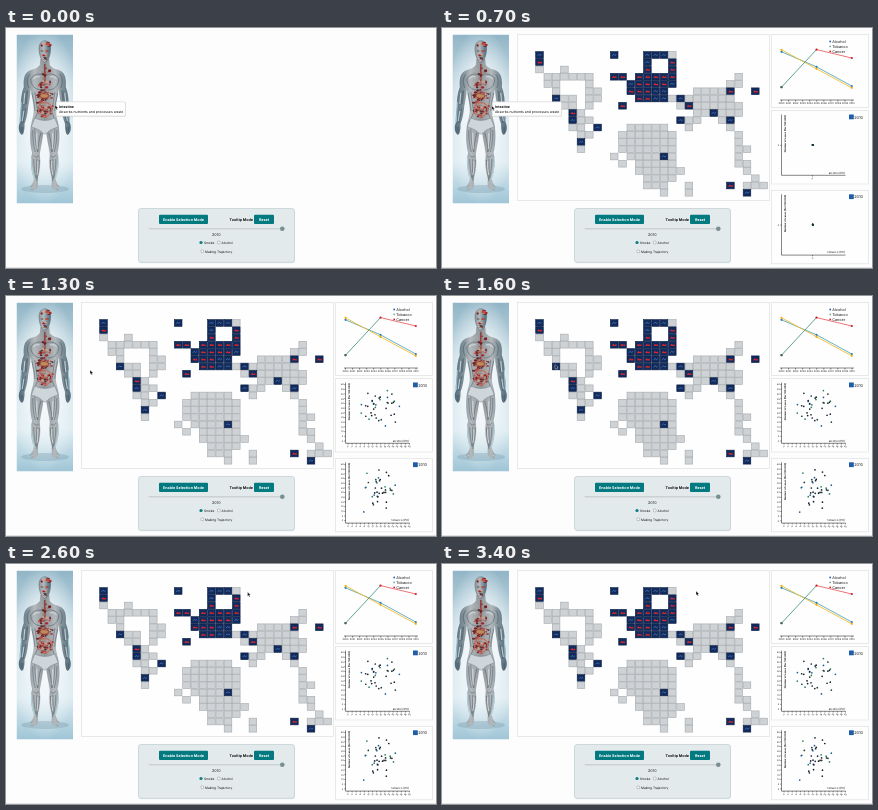
An HTML page for the animation above (3.5 s loop, 430x240 px).

```html
<!DOCTYPE html>
<html lang="en">
<head>
<meta charset="utf-8">
<title>Health dashboard</title>
<style>
  html, body { margin: 0; width: 100%; height: 100%; overflow: hidden; background: #fdfdfd; }
  svg { display: block; width: 430px; height: 240px; }
  text { font-family: Inter, Roboto, sans-serif; fill: #111; text-rendering: geometricPrecision; }
  .panel { fill: #fefefe; stroke: #dfe1e2; stroke-width: .7; }
  .axis { stroke: #222; stroke-width: .55; fill: none; }
</style>
</head>
<body>
<svg id="stage" viewBox="0 0 430 240" xmlns="http://www.w3.org/2000/svg">
  <defs>
    <linearGradient id="sky" x2="0" y2="1">
      <stop offset="0" stop-color="#91b5c6"/><stop offset=".3" stop-color="#c0d7e1"/>
      <stop offset=".75" stop-color="#dcebf1"/><stop offset="1" stop-color="#9fc5d6"/>
    </linearGradient>
    <radialGradient id="glow">
      <stop offset="0" stop-color="#fafcfd"/><stop offset=".5" stop-color="#f3f8fa" stop-opacity=".85"/>
      <stop offset="1" stop-color="#f3f8fa" stop-opacity="0"/>
    </radialGradient>
    <linearGradient id="skin">
      <stop offset="0" stop-color="#8f9498"/><stop offset=".4" stop-color="#b3b9bc"/>
      <stop offset=".7" stop-color="#7d8d96"/><stop offset="1" stop-color="#536d7d"/>
    </linearGradient>
    <clipPath id="frame"><rect x="10.5" y="6.5" width="56.5" height="169"/></clipPath>
    <g id="half">
      <path fill="url(#skin)" d="M-.2 31H4.5L5 37C8 41 12 41 16 43C21 46 21.5 52 21 59
        C23.5 65 24 72 24 79C25 86 25 92 25 95C27 99 26 105 23 107C21 106 20 101 20.3 96
        C18 90 17 84 16.5 78C15 71 14.5 66 14 61C13 68 11.5 74 11 82C11 88 13 92 14 98
        C15 106 15 116 12.7 125C14.8 132 14 142 11 151C11 155 15 158 15 161C13 164 8 163 6.8 158
        L7 150C4.5 142 4 135 5 126C3.6 117 2 110 1 102L-.2 100Z"/>
      <g fill="none" stroke="#36464f" stroke-width=".7" opacity=".6">
        <path d="M1 47C6 45 11 46 14 51C14 57 10 62 3 62M15 46C18 50 18 55 16 60M10 64L7 84L11 94
          M13 65C11 73 10 78 10 83M18 63L20 77M19 80L22 95M17 62L18.5 76M22 99V106M23.5 99V105"/>
        <path d="M10 100C10 110 9 118 7 124M4 105C6 112 7 119 7 124M12 102C12 111 11 119 9.5 124
          M6 128C9 130 10 129 11 127M8 131L8.5 151M11 131C11 138 10 145 9 150M5.5 132C6 140 7 146 8 153"/>
      </g>
      <g fill="none" stroke="#e3eaec" stroke-width="1" opacity=".75">
        <path d="M5 49C8 48 10 49 12 51M8 105C8 111 8 116 7.5 121M7 133C6.5 138 7 143 8 147M20 65L21 76M21 83L22.5 93"/>
      </g>
      <path fill="none" stroke="#b5e7f7" stroke-width="1" opacity=".7"
        d="M23.5 74L24.5 94M13.5 130C13.5 138 12 146 10.5 151M12 159L15 161"/>
    </g>
  </defs>
</svg>
<script>
const LOOP = 3500, STEP = 100;
const stage = document.getElementById('stage');

function el(tag, attrs = {}, parent = stage, text) {
  const node = document.createElementNS(stage.namespaceURI, tag);
  for (const k in attrs) node.setAttribute(k, attrs[k]);
  if (text !== undefined) node.textContent = text;
  parent.appendChild(node);
  return node;
}
const group = (parent = stage) => el('g', {}, parent);
const box = (x, y, width, height, attrs, parent) => el('rect', { x, y, width, height, ...attrs }, parent);
const dot = (cx, cy, r, fill, parent) => el('circle', { cx, cy, r, fill }, parent);
const path = (d, attrs, parent) => el('path', { d, fill: 'none', ...attrs }, parent);
const label = (x, y, size, text, attrs, parent) => el('text', { x, y, 'font-size': size, ...attrs }, parent, text);
const mid = { 'text-anchor': 'middle' };
const bold = { 'font-weight': 700 };

function random(seed) {
  return () => (seed = (seed * 16807) % 2147483647) / 2147483647;
}

function drawBody() {
  const g = group();
  g.setAttribute('clip-path', 'url(#frame)');
  box(10.5, 6.5, 56.5, 169, { fill: 'url(#sky)' }, g);
  el('ellipse', { cx: 39, cy: 88, rx: 36, ry: 88, fill: 'url(#glow)' }, g);
  el('ellipse', { cx: 39, cy: 161, rx: 24, ry: 4, fill: '#7799aa', opacity: .35 }, g);
  const body = el('g', { transform: 'translate(38.8 0)' }, g);
  for (const s of [1, -1]) el('use', { href: '#half', transform: `scale(${s} 1)` }, body);
  path('M-5.8 21C-6 10 6 10 5.8 21C5.5 28 3 34 0 34.5C-3 34-5.5 28-5.8 21Z', { fill: 'url(#skin)', stroke: '#59656b', 'stroke-width': .5 }, body);
  path('M-10 90Q0 95 10 90L13.5 99Q5 101 1 106H-1Q-5 101-13.5 99Z', { fill: '#cfd6da', stroke: '#74858f', 'stroke-width': .5 }, body);
  path('M-4 23H-1.4M1.4 23H4M-1.5 29.5H1.5', { stroke: '#46363a', 'stroke-width': .8 }, body);
  path('M0 36V54', { stroke: '#8d4541', 'stroke-width': 1.6 }, body);

  // Organ clusters: centre x, centre y, half width, half height, count
  const rnd = random(91);
  const tones = ['#a52626', '#712024', '#c4483c', '#c9a18c', '#5c3032', '#a9756a'];
  for (const [x, y, w, h, n] of [[1, 17, 4.3, 3.5, 10], [1, 27, 3, 5, 6], [0, 44, 6, 4, 8], [1, 56, 7, 6, 22], [0, 67, 9, 5, 30], [0, 80, 8.5, 10, 54]])
    for (let i = 0; i < n; i++) {
      const a = rnd() * 6.283, d = Math.sqrt(rnd());
      el('ellipse', {
        cx: x + Math.cos(a) * d * w, cy: y + Math.sin(a) * d * h,
        rx: .7 + rnd() * 1.2, ry: .6 + rnd() * .8, fill: tones[i % 6]
      }, body);
    }
  path('M-5 67Q-2 64 4 67Q5 69 1 70Q-4 71-5 67Z', { fill: '#c28a58', stroke: '#7e2a28', 'stroke-width': .6 }, body);
  path('M-6 77Q0 72 6 77Q8 84 3 88Q-2 90-6 85Z', { stroke: '#c4685a', 'stroke-width': 1 }, body);
}

function drawControls() {
  box(132.5, 181, 156.5, 54.2, { rx: 3, fill: '#d3dcdf', opacity: .6 });
  box(132.5, 180.5, 156, 53.8, { rx: 2.5, fill: '#e3eaec', stroke: '#c0cdd2', 'stroke-width': .7 });
  const button = (x, w, text) => {
    box(x, 186.8, w, 9.2, { rx: 1, fill: '#027a80' });
    label(x + w / 2, 192.8, 3.7, text, { ...mid, ...bold, style: 'fill:#fff' });
  };
  button(153, 49, 'Enable Selection Mode');
  button(248, 20, 'Reset');
  label(235.3, 192.8, 3.7, 'Tooltip Mode', { ...mid, ...bold });
  box(142.5, 200, 135, 1.6, { rx: .8, fill: '#ccd1d3' });
  dot(276.3, 200.8, 2.3, '#788f92');
  label(210.3, 208, 3.7, '2010', mid);
  dot(195, 214.5, 1.6, '#0b7d80');
  label(198, 215.7, 3.2, 'Smoke');
  const check = (x, y) => box(x, y, 2.6, 2.6, { rx: .4, fill: '#fff', stroke: '#777', 'stroke-width': .4 });
  check(211.5, 213.2);
  label(215.5, 215.7, 3.2, 'Alcohol');
  check(195, 222);
  label(199, 224.6, 3.2, 'Making Trajectory');
  box(0, 239, 430, 1, { fill: '#e3e3e3' });
}

// g: no data, b: data, r: data with a red mark
const TILES = [
  'b........b...bbbg',
  'r............b..r',
  'g..g.........r..r',
  '.gggggg..rr.rrrrr.......g',
  '.gg...g....brrrrb......gg',
  '..g...gg...rrrbb...ggggr..r',
  '..bgg.gg....rrbbgbgggggg',
  '...gg.g...r......grgggggg',
  '....rg.............ggbggg',
  '....bgg..........bgg..gb',
  '....gg.b...ggggg..g....g',
  '.....gg...ggggggg.......g',
  '.....b....ggggggg.......g',
  '.....g....ggggggg.......gg',
  '.........g.ggggbg.......g',
  '..........g.ggggg.......gg',
  '............gggggg.......g',
  '.............gggg.........g',
  '.............ggg..g....r.ggg',
  '...............g..g......b'
];

function drawMap() {
  const g = group();
  box(75.5, 6.5, 252, 166, { class: 'panel' }, g);
  TILES.forEach((row, r) => [...row].forEach((kind, c) => {
    if (kind === '.') return;
    const x = 97.5 + c * 8.3, y = 27 + r * 7.25;
    box(x - 3.8, y - 3.35, 7.6, 6.7, {
      fill: kind === 'g' ? '#cfd2d4' : '#102b5c',
      stroke: kind === 'g' ? '#a4a9ad' : '#0a1d43', 'stroke-width': .6
    }, g);
    if (kind === 'b') path(`M${x - 2} ${y + .8}l1.5-1.6 1.3 1.2 1.3-.8`, { stroke: '#4a72b4', 'stroke-width': .9 }, g);
    if (kind === 'r') path(`M${x - 2.3} ${y + 1}l1.4-2.1 1.5 1 1.6-.3.4 1.7z`, { fill: '#d8262e' }, g);
  }));
  return g;
}

function drawLines(parent) {
  box(329.5, 6.5, 97, 73, { class: 'panel' }, parent);
  path('M338 72H412', { class: 'axis' }, parent);
  for (let i = 0; i <= 10; i++) {
    const x = 339.5 + i * 7.05;
    path(`M${x} 72v1.5`, { class: 'axis' }, parent);
    label(x, 76.2, 2.4, 2000 + i, mid, parent);
  }
  const xs = [339.5, 374.5, 409.8];
  const series = (ys, color, tones) => {
    for (let i = 0; i < 2; i++)
      path(`M${xs[i]} ${ys[i]}L${xs[i + 1]} ${ys[i + 1]}`, { stroke: tones[i], 'stroke-width': .9 }, parent);
    ys.forEach((y, i) => dot(xs[i], y, 1.1, color, parent));
  };
  series([23.8, 38.8, 58], '#2f78b8', ['#58aabd', '#58aabd']);
  series([21.8, 40.8, 59.8], '#f0b000', ['#f2bd35', '#f2bd35']);
  series([59.2, 21.6, 30], '#d51920', ['#4c998c', '#ee6567']);
  dot(339.5, 59.2, 1.1, '#23766f', parent);
  [['Alcohol', '#2664ad'], ['Tobacco', '#7fae9c'], ['Cancer', '#d51920']].forEach(([name, color], i) => {
    dot(388.2, 13.5 + i * 4.9, .9, color, parent);
    label(390.2, 14.9 + i * 4.9, 3.8, name, {}, parent);
  });
}

function drawScatter(parent, top, name, seed, cx, cy, spread) {
  const g = el('g', { transform: `translate(0 ${top})` }, parent);
  box(329.5, 82.5, 97, 73.5, { class: 'panel' }, g);
  path('M339.5 86.5V147.3H403.5', { class: 'axis' }, g);
  label(0, 0, 2.45, 'Number of cases (Per 100.000)', { ...bold, 'text-anchor': 'end', transform: 'translate(343.6 87) rotate(-90)' }, g);
  label(403, 145.7, 2.8, name, { 'text-anchor': 'end' }, g);
  box(407, 86.5, 4.8, 4.8, { fill: '#1f5da8' }, g);
  label(412.2, 90.6, 3.9, '2010', {}, g);

  const rnd = random(seed), bell = () => rnd() + rnd() - 1;
  const tones = ['#111c22', '#1d3a35', '#14213f', '#27815f', '#1c2b33', '#1f5d9c'];
  const marks = Array.from({ length: 38 }, (_, i) => ({
    x: cx + bell() * spread, y: cy + bell() * 29,
    node: dot(370.8, 117, .85, tones[i % 6], g)
  }));
  const ticks = [];
  for (let i = 0; i < 16; i++)
    ticks.push({ x: 342 + i * 4.1, y: 147.3, node: tick('M0 0v1.2', 0, 4, i * 2, 'rotate(35 0 3)') });
  for (let i = 0; i < 13; i++)
    ticks.push({ x: 339.5, y: 145 - i * 4.7, side: true, node: tick('M0 0h-1.2', -3.1, .8, i * 5, '') });
  function tick(d, x, y, value, transform) {
    const t = group(g);
    path(d, { class: 'axis' }, t);
    label(x, y, 2.2, value, { ...mid, transform }, t);
    return t;
  }
  return k => {
    for (const { x, y, node } of marks) {
      node.setAttribute('cx', 370.8 + (x - 370.8) * k);
      node.setAttribute('cy', 117 + (y - 117) * k);
    }
    for (const { x, y, side, node } of ticks) {
      const px = side ? x : 370.8 + (x - 370.8) * k;
      const py = side ? 117 + (y - 117) * k : y;
      node.setAttribute('transform', `translate(${px} ${py})`);
      const first = node.textContent === '0';
      node.setAttribute('visibility', first || k > .02 ? 'inherit' : 'hidden');
    }
  };
}

function drawTip() {
  const g = group();
  box(50.7, 74.3, 69.2, 14.4, { rx: 1, fill: '#ccc', opacity: .4 }, g);
  box(50.4, 73.8, 69, 14.3, { rx: .8, fill: '#fff', stroke: '#cfcfcf', 'stroke-width': .6 }, g);
  label(53, 79.8, 3.5, 'Intestine', bold, g);
  label(53, 85, 3.45, 'Absorbs nutrients and processes waste', {}, g);
  return g;
}

drawBody();
drawControls();
const charts = group();
drawLines(charts);
const alcohol = drawScatter(charts, 0, 'alcohol (PC)', 4127, 372, 112, 27);
const tobacco = drawScatter(charts, 79.8, 'tobacco (PC)', 7731, 372, 114, 21);
const map = drawMap();
const tip = drawTip();
const cursor = path('M0 0V4.3L1 3.4 1.8 5 2.6 4.6 1.9 3.1H3.2Z', { fill: '#111', stroke: '#fff', 'stroke-width': .35 });

// time, x, y
const route = [[0, 49, 77], [1000, 50, 78], [1300, 84, 74], [1600, 113, 68.5], [2000, 136.5, 102.5], [2600, 241.5, 28], [3100, 254, 27], [3500, 254, 27]];
const clamp = v => Math.min(1, Math.max(0, v));
const ease = v => v < .5 ? 4 * v ** 3 : 1 - (2 - 2 * v) ** 3 / 2;
const show = (node, on) => node.setAttribute('visibility', on ? 'inherit' : 'hidden');

function render(t) {
  charts.style.display = t >= 300 ? '' : 'none';
  show(map, t >= 600);
  show(tip, t < 1200);
  tip.setAttribute('transform', `translate(0 ${t >= 900 ? .8 : 0})`);
  alcohol(ease(clamp((t - 600) / 700)));
  tobacco(ease(clamp((t - 600) / 800)));
  const i = route.findIndex(p => p[0] > t);
  const [a, x, y] = route[i - 1], [b, u, v] = route[i];
  const k = (t - a) / (b - a);
  cursor.setAttribute('transform', `translate(${x + (u - x) * k} ${y + (v - y) * k})`);
}

const start = performance.now();
function loop() {
  const t = (performance.now() - start) % LOOP;
  render(Math.floor(t / STEP) * STEP);
  requestAnimationFrame(loop);
}
render(0);
requestAnimationFrame(loop);
</script>
</body>
</html>
```
